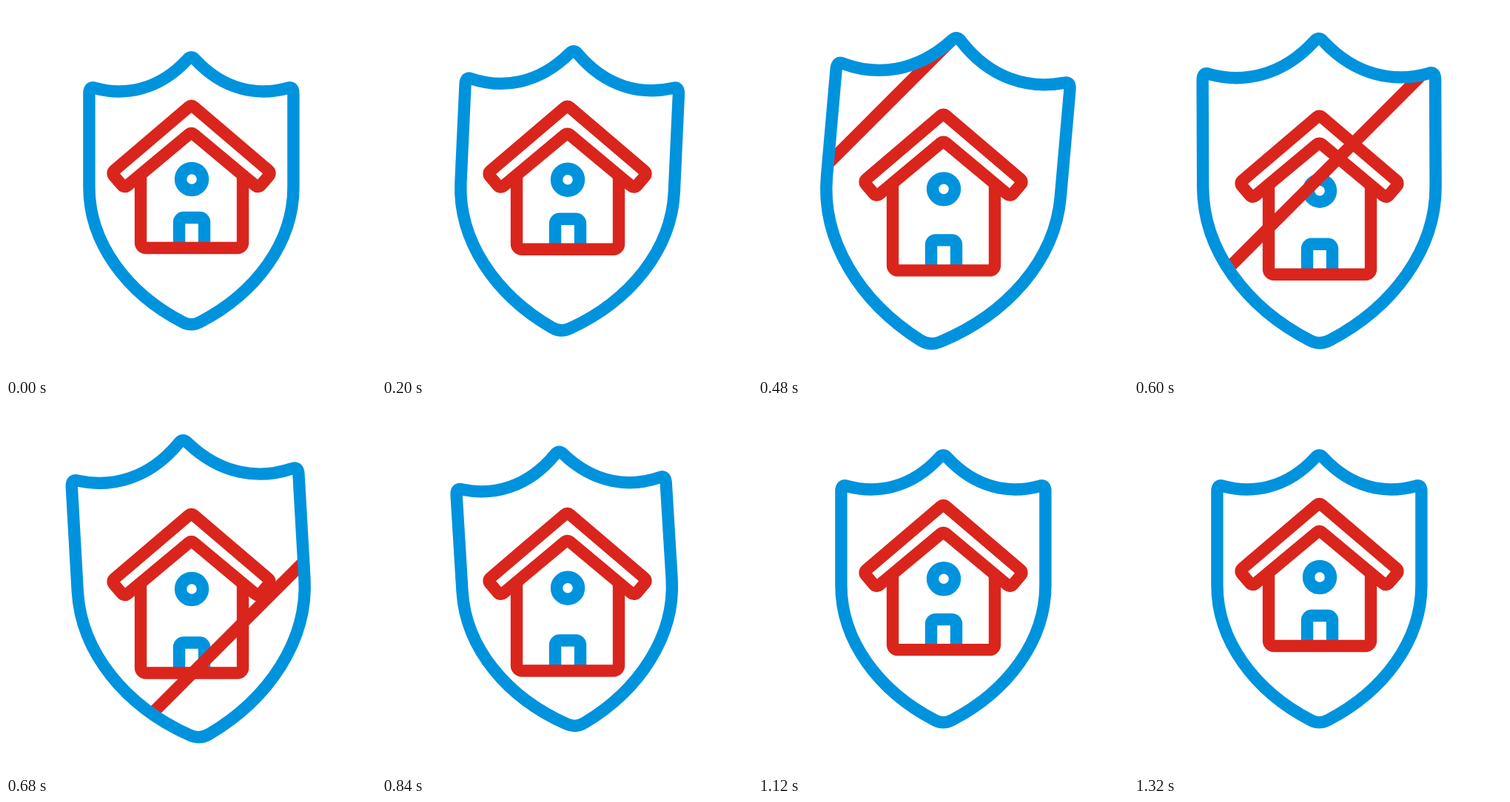
Animation of 500x500 px, one loop 1.44 s. Source, as an HTML page with a canvas:

```html
<!DOCTYPE html>
<html lang="en">
<head>
<meta charset="utf-8">
<title>Home shield</title>
<style>
html, body { margin: 0; width: 100%; height: 100%; overflow: hidden; background: #fff; }
canvas { display: block; width: 100vw; height: 100vh; }
</style>
</head>
<body>
<canvas id="stage" width="500" height="500"></canvas>
<script>
const ctx = document.getElementById('stage').getContext('2d');
const BLUE = '#0093dd', RED = '#da251d';
const LOOP = 1440, STEP = 40;

const cubic = (a, b, t) => 3 * a * t * (1 - t) ** 2 + 3 * b * t * t * (1 - t) + t ** 3;

// Symmetric ease-in-out bezier (h, 0, 1 - h, 1)
function ease(u, h) {
  if (u <= 0) return 0;
  if (u >= 1) return 1;
  let lo = 0, hi = 1;
  for (let i = 0; i < 24; i++) {
    const mid = (lo + hi) / 2;
    if (cubic(h, 1 - h, mid) < u) lo = mid; else hi = mid;
  }
  return cubic(0, 1, lo);
}

// keys: [time, value] pairs in order
function track(keys, t, h) {
  if (t <= keys[0][0]) return keys[0][1];
  for (let i = 1; i < keys.length; i++) {
    const [t0, v0] = keys[i - 1], [t1, v1] = keys[i];
    if (t <= t1) return v0 + (v1 - v0) * ease((t - t0) / (t1 - t0), h);
  }
  return keys[keys.length - 1][1];
}

const SCALE = [[0, 1], [500, 1.149], [1000, 1]];
const ANGLE = [[0, 0], [412, 5.6], [750, -3.9], [1110, 0]];
const DROP = [[80, 0], [680, 1], [1320, 0]];
const SWEEP = [[160, 182], [1060, 817]];

function stroke(color, path) {
  ctx.strokeStyle = color;
  if (path) ctx.stroke(path); else ctx.stroke();
}

// Polyline with softened corners
function rounded(points, r) {
  const p = new Path2D();
  p.moveTo(...points[0]);
  for (let i = 1; i < points.length - 1; i++) p.arcTo(...points[i], ...points[i + 1], r);
  p.lineTo(...points[points.length - 1]);
  return p;
}

function shieldPath(scale, angle) {
  const outline = new Path2D(
    'M112 118Q112 108 120 111C160 122 206 114 244.5 72.5Q250 66 255.5 72.5' +
    'C294 114 340 122 380 111Q388 108 388 118' +
    'L388 245C388 320 337 388 262 427Q250 433.5 238 427C163 388 112 320 112 245Z');
  const m = new DOMMatrix().translate(250.4, 250).rotate(angle).scale(scale).translate(-250, -250);
  const path = new Path2D();
  path.addPath(outline, m);
  return path;
}

function drawHouse(p) {
  const roof = 14 * p, base = 36.5 * p, mid = 250.5;

  stroke(BLUE, rounded([[234, 325 + base], [234, 286 + base], [268, 286 + base], [268, 325 + base]], 6));
  ctx.beginPath();
  ctx.arc(251, 234 + 16 * p, 15, 0, Math.PI * 2);
  stroke(BLUE);

  stroke(RED, rounded([[182, 228 + roof], [182, 327 + base], [320, 327 + base], [320, 228 + roof]], 7));

  const ridge = [mid, 133.5 + roof], inner = [mid, 170.5 + roof];
  const side = s => [[142.5, 225.5], [160, 246]].map(([x, y]) => [mid + s * (mid - x), y + roof]);
  const [leftTip, leftFoot] = side(-1), [rightTip, rightFoot] = side(1);
  const corners = [ridge, rightTip, rightFoot, inner, leftFoot, leftTip];
  const eaves = new Path2D();
  eaves.moveTo((ridge[0] + leftTip[0]) / 2, (ridge[1] + leftTip[1]) / 2);
  corners.forEach((c, i) => eaves.arcTo(...c, ...corners[(i + 1) % corners.length], 5));
  eaves.closePath();
  stroke(RED, eaves);
}

function draw(time) {
  let t = Math.floor((time % LOOP) / STEP) * STEP;
  if (t < 80 || t >= 1320) t = 0;

  ctx.fillStyle = '#fff';
  ctx.fillRect(0, 0, 500, 500);
  ctx.lineWidth = 16.4;
  ctx.lineJoin = 'round';

  drawHouse(track(DROP, t, 0.6));

  const shield = shieldPath(track(SCALE, t, 0.5), track(ANGLE, t, 0.5));
  const sum = track(SWEEP, t, 0.6);
  if (sum > SWEEP[0][1] && sum < 770) {
    ctx.save();
    ctx.clip(shield);
    ctx.beginPath();
    ctx.moveTo(-50, sum + 50);
    ctx.lineTo(sum + 50, -50);
    stroke(RED);
    ctx.restore();
  }
  stroke(BLUE, shield);
}

const start = performance.now();
function tick() {
  draw(performance.now() - start);
  requestAnimationFrame(tick);
}
tick();
</script>
</body>
</html>
```
